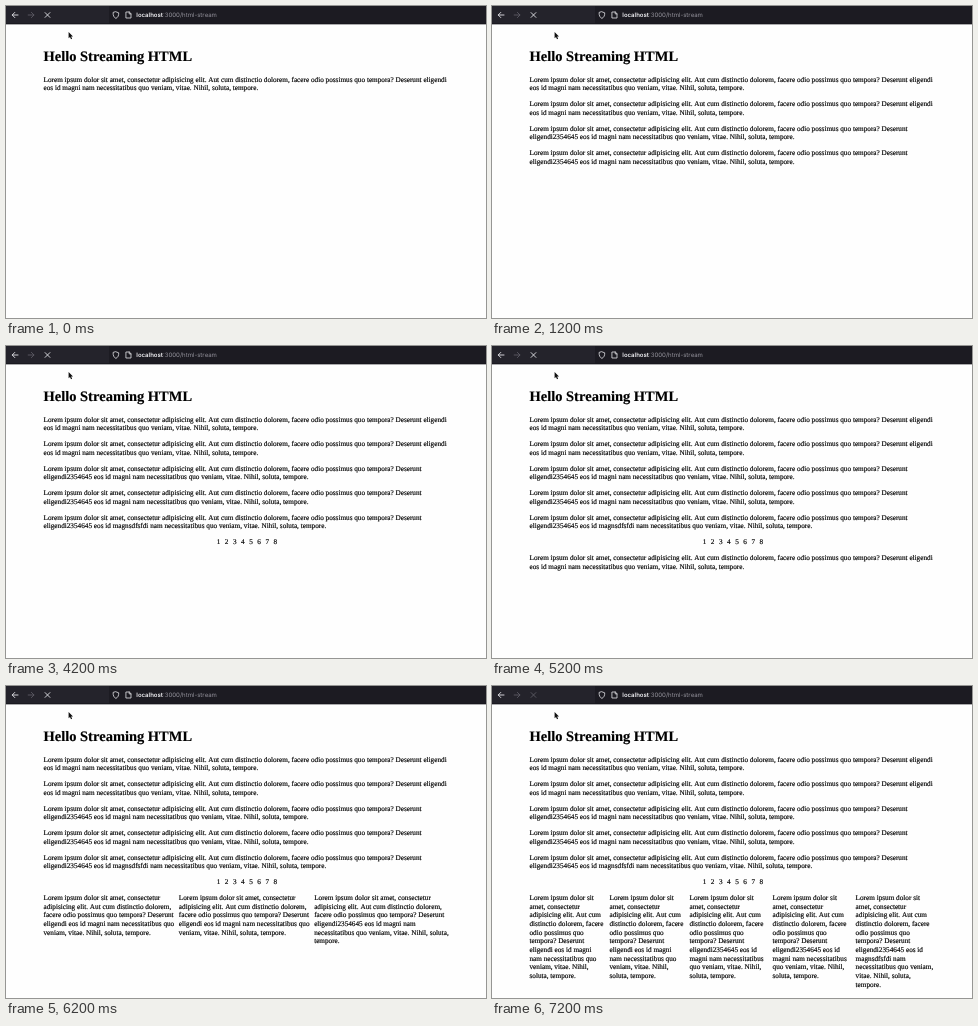
An HTML page with a canvas for the animation above (7.3 s loop, 480 by 312 pixels).

```html
<!DOCTYPE html>
<html lang="en">
<head>
<meta charset="utf-8">
<title>Hello Streaming HTML</title>
<style>
html, body { margin: 0; width: 100%; height: 100%; overflow: hidden; background: #fefefe; }
canvas { display: block; width: 480px; height: 312px; }
</style>
</head>
<body>
<canvas id="stage"></canvas>
<script>
const W = 480, H = 312, LOOP = 7300;
const canvas = document.getElementById('stage');
const ctx = canvas.getContext('2d');
const dpr = window.devicePixelRatio || 1;
canvas.width = W * dpr;
canvas.height = H * dpr;

// Page geometry: CSS pixels of the page times its zoom on the stage
const SX = 0.452, SY = 0.4545;
const LEFT = 37.5, WIDTH = 900 * SX, GAP = 10 * SX;
const LINE = 19 * SY, PARA = 54 * SY;
const FIRST = 75.55, NUMBERS = FIRST + 5 * PARA, COLUMNS = NUMBERS + 35 * SY;
const SERIF = '"Liberation Serif", "Times New Roman", serif';
const BODY = `${16 * SX}px ${SERIF}`;
const HEAD = `bold ${32 * SX}px ${SERIF}`;
const UI = 'Inter, sans-serif';

const lorem = (word, magni) =>
  'Lorem ipsum dolor sit amet, consectetur adipisicing elit. Aut cum distinctio dolorem, ' +
  `facere odio possimus quo tempora? Deserunt ${word} eos id ${magni} nam ` +
  'necessitatibus quo veniam, vitae. Nihil, soluta, tempore.';
const plain = lorem('eligendi', 'magni');
const coded = lorem('eligendi2354645', 'magni');
const texts = [plain, plain, coded, coded, lorem('eligendi2354645', 'magnsdfsfdi')];

const paraTimes = [0, 600, 900, 1200, 1500];
const numberTimes = Array.from({ length: 8 }, (_, i) => 2100 + 300 * i);
const columnTimes = [5100, 5700, 6100, 6300, 6600];
const LOADED = 7100;

const passed = (times, t) => times.filter(x => t >= x).length;

// A hairline outline gives the slightly heavier strokes of the page text
function text(str, x, y, font, color = '#000', outline = 0.16) {
  ctx.font = font;
  ctx.fillStyle = ctx.strokeStyle = color;
  ctx.lineWidth = outline;
  ctx.fillText(str, x, y);
  if (outline) ctx.strokeText(str, x, y);
  return ctx.measureText(str).width;
}

function wrap(str, width) {
  const lines = [];
  let line = '';
  ctx.font = BODY;
  for (const word of str.split(' ')) {
    const next = line ? line + ' ' + word : word;
    if (line && ctx.measureText(next).width > width) {
      lines.push(line);
      line = word;
    } else line = next;
  }
  return lines.concat(line);
}

function paragraph(str, x, y, width) {
  wrap(str, width).forEach((line, i) => text(line, x, y + i * LINE, BODY));
}

// Columns shrink in proportion to their unwrapped width, as flex items do
function columns(count) {
  ctx.font = BODY;
  const shown = texts.slice(0, count);
  const natural = shown.map(s => ctx.measureText(s).width);
  const total = natural.reduce((a, b) => a + b, 0);
  const room = WIDTH - GAP * (count - 1);
  let x = LEFT;
  shown.forEach((s, i) => {
    const w = natural[i] * room / total;
    paragraph(s, x, COLUMNS, w);
    x += w + GAP;
  });
}

function numbers(count) {
  ctx.font = BODY;
  const digit = ctx.measureText('0').width;
  const step = digit + GAP;
  const x = LEFT + WIDTH / 2 - (count * step - GAP) / 2;
  for (let i = 0; i < count; i++) text(String(i + 1), x + i * step, NUMBERS, BODY);
}

function stroke(path, color, width = 0.9) {
  ctx.strokeStyle = color;
  ctx.lineWidth = width;
  ctx.stroke(new Path2D(path));
}

function toolbar(loading) {
  ctx.fillStyle = '#24232b';
  ctx.fillRect(0, 0, W, 18.2);
  ctx.fillStyle = '#1c1b22';
  ctx.fillRect(103, 0, W - 103, 17.5);
  ctx.fillStyle = '#111016';
  ctx.fillRect(0, 17.5, W, 0.7);

  const light = '#e4e4e8', dim = '#5c5b64';
  stroke('M12 9H6.3M8.8 6.4L6.2 9L8.8 11.6', light);
  stroke('M22.2 9H27.9M25.4 6.4L28 9L25.4 11.6', dim);
  stroke('M39.1 6.6L43.9 11.4M43.9 6.6L39.1 11.4', loading ? light : dim);
  stroke('M109.9 5.8L112.7 6.8C112.8 9.6 112 11.3 109.9 12.4C107.8 11.3 107 9.6 107.1 6.8Z', light, 0.8);
  stroke('M120.3 6H123.3L125 7.7V12H120.3ZM123.2 6V7.9H125', light, 0.8);

  const w = text('localhost', 130.3, 11.2, `600 6.05px ${UI}`, '#f4f4f7', 0);
  text(':3000/html-stream', 130.3 + w, 11.2, `400 6.05px ${UI}`, '#92919a', 0);
}

function cursor() {
  const arrow = new Path2D('M62.6 25.9V32.2L64 30.9L65 33.2L66.1 32.7L65.1 30.5H67Z');
  ctx.strokeStyle = '#fff';
  ctx.lineWidth = 0.8;
  ctx.stroke(arrow);
  ctx.fillStyle = '#111';
  ctx.fill(arrow);
}

function draw(t) {
  ctx.setTransform(dpr, 0, 0, dpr, 0, 0);
  ctx.textRendering = 'geometricPrecision';
  ctx.fontKerning = 'none';
  ctx.lineCap = ctx.lineJoin = 'round';
  ctx.fillStyle = '#fefefe';
  ctx.fillRect(0, 0, W, H);

  toolbar(t < LOADED);
  text('Hello Streaming HTML', LEFT, 54.6, HEAD);
  texts.slice(0, passed(paraTimes, t))
    .forEach((s, i) => paragraph(s, LEFT, FIRST + i * PARA, WIDTH));
  numbers(passed(numberTimes, t));
  columns(passed(columnTimes, t));
  cursor();
}

const start = performance.now();
function tick() {
  draw((performance.now() - start) % LOOP);
  requestAnimationFrame(tick);
}
tick();
</script>
</body>
</html>
```
